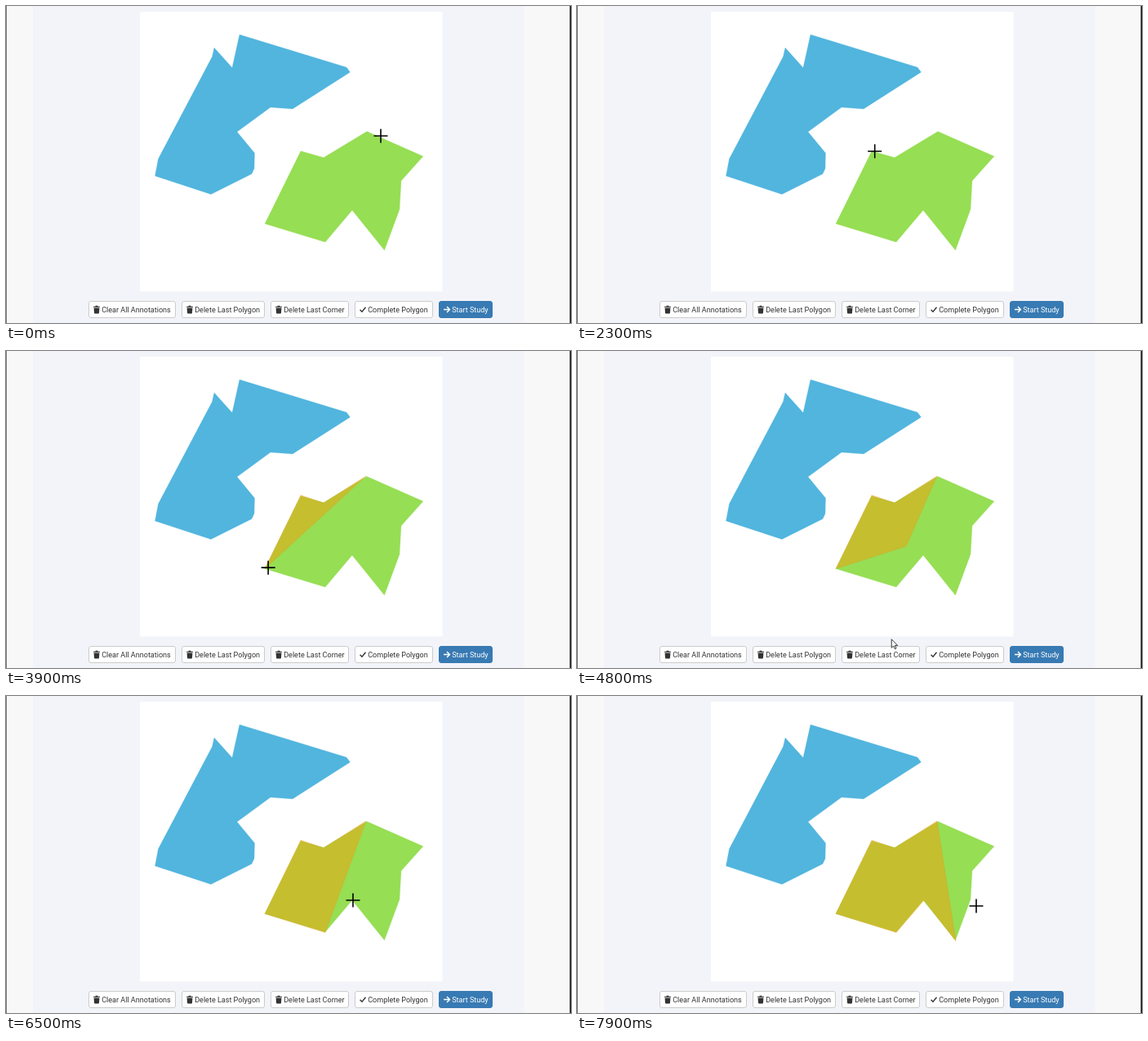
An HTML page for the animation above (8 s loop, 692x388 px).

```html
<!DOCTYPE html>
<html lang="en">
<head>
<meta charset="utf-8">
<title>Polygon annotation</title>
<style>
  html, body { margin: 0; width: 100%; height: 100%; overflow: hidden; background: #f8f8f9; }
  svg { display: block; width: 100vw; height: 100vh; }
  text { font: 9.05px Roboto, Arial, sans-serif; fill: #333; }
  .btn rect { fill: #fff; stroke: #ccc; }
  .btn.primary rect { fill: #387ab3; stroke: #387ab3; }
  .btn.primary text { fill: #fff; }
  .btn.held rect { fill: #d6d6d6; stroke: #b5b5b5; }
</style>
</head>
<body>
<svg viewBox="0 0 692 388">
  <defs>
    <g id="trash" fill="#333">
      <path d="M0 1.2h2.2l.6-1h2.4l.6 1H8v1.1H0z"/>
      <path d="M.6 3h6.8L7 9.1q-.1.9-1 .9H2q-.9 0-1-.9z"/>
    </g>
    <path id="check" d="M.6 5.2 3 7.7 7.5 2.3" fill="none" stroke="#333" stroke-width="1.4"/>
    <path id="arrow" d="M0 5h7.3M4 1.4 7.5 5 4 8.6" fill="none" stroke="#fff" stroke-width="1.4"/>
  </defs>
  <rect width="692" height="388" fill="#f8f8f9"/>
  <rect width="1" height="388" fill="#777"/>
  <rect x="33" width="601.5" height="388" fill="#f3f4f9"/>
  <rect x="690.5" width="1.5" height="388" fill="#111"/>
  <rect x="164" y="7" width="370.5" height="342.5" fill="#fff"/>
  <path fill="#51b5de" stroke="#51b5de" stroke-opacity=".25"
    d="M255 51 277 75.500 286 35 417 75 421.500 81 351 126 324 124 283 154 304.500 180 304 199 301 205.500 251 230.500 182.500 208 186.500 187 252.500 62z"/>
  <path fill="#96de54" stroke="#96de54" stroke-opacity=".25"
    d="M361 177.500 389 185.500 442 153.500 511 184 484 214 482 249 463.500 299 424 250 391 289 317 266.500z"/>
  <polygon id="mark" fill="rgb(229,171,24)" fill-opacity=".6" stroke="rgb(226,150,30)" stroke-opacity=".3"/>
  <g id="bar"></g>
  <g id="pointer">
    <path id="cross" d="M-8.500 0h17M0-8.500v17" stroke="#000" stroke-width="1.6"/>
    <path id="tip" d="M0 0v10.500l2.500-2.300 1.600 3.700 1.700-.7-1.600-3.600h3.300z" fill="#fff" stroke="#222" stroke-width=".9"/>
    <path id="hand" d="M-1 0q1-1 2 0v4l4 .8q1.500.4 1.500 2L6 12H0L-3.500 7.500q0-1.500 1.300-1L-1 7.500z" fill="#fff" stroke="#222" stroke-width=".9"/>
  </g>
</svg>
<script>
const $ = id => document.getElementById(id);

let left = 101.5;
function button(icon, label, width) {
  const x = left;
  left += width + 8;
  return `<g class="btn${icon === 'arrow' ? ' primary' : ''}">
    <rect x="${x}" y="361.5" width="${width}" height="20" rx="2.5"/>
    <use href="#${icon}" x="${x + 5.5}" y="366.5"/>
    <text x="${x + 15.7}" y="374.8">${label}</text></g>`;
}
$('bar').innerHTML =
  button('trash', 'Clear All Annotations', 106) +
  button('trash', 'Delete Last Polygon', 101) +
  button('trash', 'Delete Last Corner', 95) +
  button('check', 'Complete Polygon', 95) +
  button('arrow', 'Start Study', 65);
const deleteCorner = $('bar').children[2];

// Each move: start, end, x, y. The pointer clicks where it rests before the next move.
const moves = [
  [0, 900, 441, 153],
  [950, 1700, 389, 186],
  [1950, 2500, 361, 176.5],
  [2750, 3600, 317, 266.5],
  [3890, 4300, 403, 239],
  [4400, 5000, 383, 367],
  [5300, 5700, 391, 289.5],
  [6100, 6500, 425, 250],
  [6700, 7200, 464, 300],
  [7400, 7900, 489, 257]
];
const canvasEnd = 349, barTop = 361;

function stateAt(t) {
  let x = 459, y = 159, held = false;
  const corners = [];
  moves.forEach(([from, to, nextX, nextY], i) => {
    if (t < from) return;
    if (y > barTop) corners.pop();
    else if (i) {
      corners.push([x, y]);
      held = false;
    }
    const p = Math.min(1, (t - from) / (to - from));
    const ease = 1 - (1 - p) ** 2;
    x += (nextX - x) * ease;
    y += (nextY - y) * ease;
    held ||= y > barTop;
  });
  return { x, y, held, corners };
}

function draw(t) {
  const { x, y, held, corners } = stateAt(t);
  const shape = y < canvasEnd ? 'cross' : y < barTop ? 'tip' : 'hand';
  for (const id of ['cross', 'tip', 'hand'])
    $(id).style.display = id === shape ? '' : 'none';
  $('pointer').setAttribute('transform', `translate(${x} ${y})`);
  $('mark').setAttribute('points', corners.length > 2 ? corners.join(' ') : '');
  deleteCorner.classList.toggle('held', held);
}

const start = performance.now();
function tick() {
  const t = (performance.now() - start) % 8000;
  draw(Math.floor(t / 100) * 100);
  requestAnimationFrame(tick);
}
tick();
</script>
</body>
</html>
```
